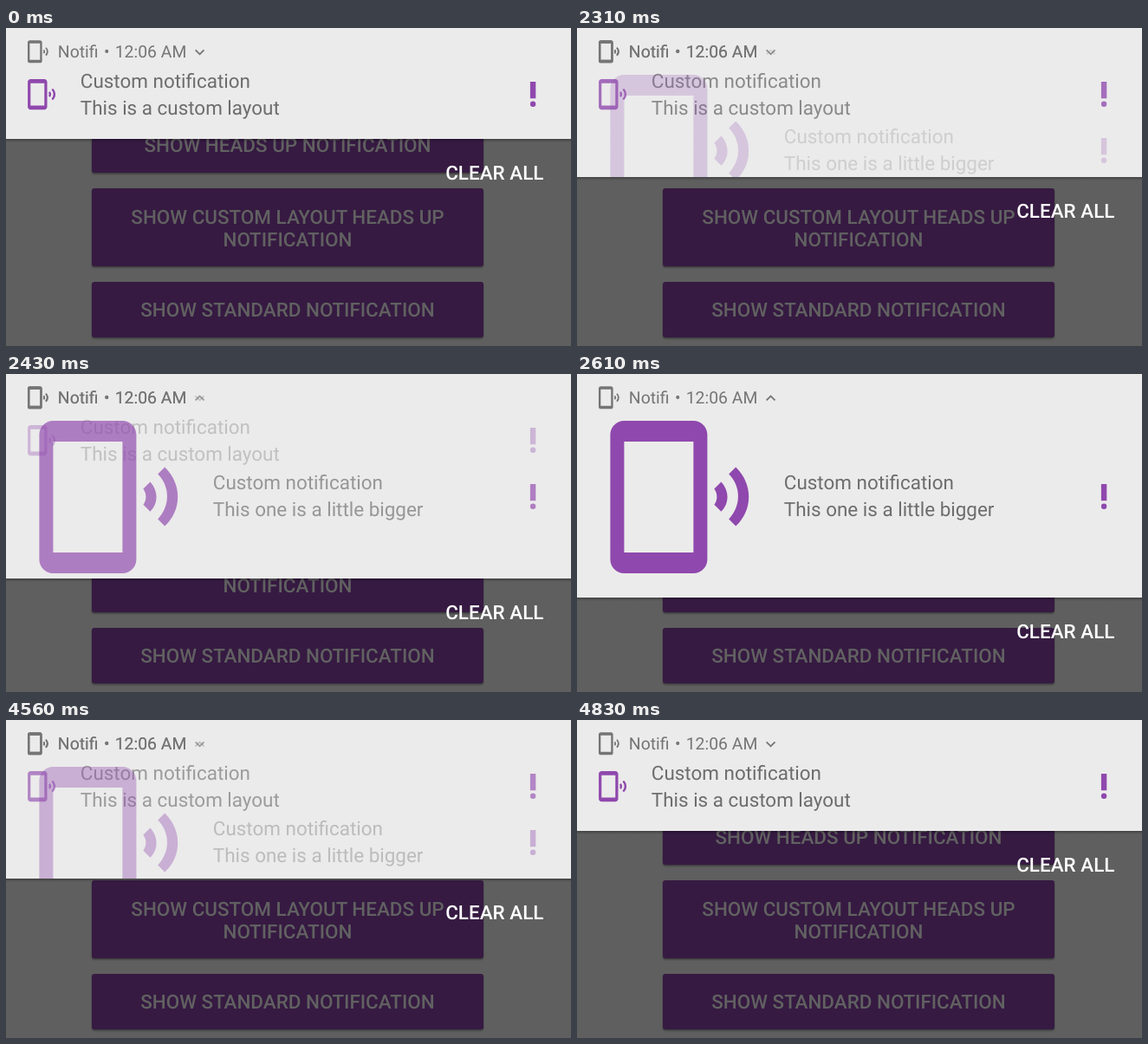
Animation of 652x367 px, one loop 5.46 s. Source, as an HTML page with a canvas:

```html
<!DOCTYPE html>
<html lang="en">
<head>
<meta charset="utf-8">
<title>Expanding notification</title>
<style>
  html, body { margin: 0; width: 100%; height: 100%; overflow: hidden; background: #5f5f5f; }
  canvas { display: block; width: 652px; height: 367px; }
</style>
</head>
<body>
<canvas id="stage" width="652" height="367"></canvas>
<script>
const ctx = document.getElementById('stage').getContext('2d');
const W = 652, H = 367, LOOP = 5460, STEP = 30;
const SMALL = 128, TALL = 258;
const PURPLE = '#8f48ad', GREY = '#757575', BODY = '#6d6d6d';
const FAMILY = 'Roboto, sans-serif', BODY_SIZE = 22.45, HEAD_SIZE = 19.4;

// Icons on a 24 unit grid
const ICON = {
  phone: new Path2D('M20.1 7.7l-1 1c1.8 1.8 1.8 4.6 0 6.5l1 1c2.5-2.3 2.5-6.1 0-8.5z' +
    'M18 9.8l-1 1c.5.7.5 1.6 0 2.3l1 1c1.2-1.2 1.2-3 0-4.3z' +
    'M14 1H4c-1.1 0-2 .9-2 2v18c0 1.1.9 2 2 2h10c1.1 0 2-.9 2-2V3c0-1.1-.9-2-2-2z' +
    'm0 19H4V4h10v16z'),
  alert: new Path2D('M10 3h4v12h-4zM14 19a2 2 0 1 1-4 0a2 2 0 1 1 4 0z'),
  down: new Path2D('M16.59 8.59L12 13.17 7.41 8.59 6 10l6 6 6-6z'),
  up: new Path2D('M12 8l-6 6 1.41 1.41L12 10.83l4.59 4.58L18 14z')
};

const clamp = v => Math.min(1, Math.max(0, v));

// Cubic bezier easing (0.4, 0, 0.2, 1)
function ease(x) {
  if (x <= 0 || x >= 1) return clamp(x);
  let lo = 0, hi = 1;
  for (let i = 0; i < 30; i++) {
    const s = (lo + hi) / 2, r = 1 - s;
    if (1.2 * r * r * s + 0.6 * r * s * s + s * s * s < x) lo = s; else hi = s;
  }
  return lo * lo * (3 - 2 * lo);
}

function icon(name, x, y, scale, color) {
  ctx.save();
  ctx.translate(x, y);
  ctx.scale(scale, scale);
  ctx.fillStyle = color;
  ctx.fill(ICON[name]);
  ctx.restore();
}

function text(str, x, y, size, color, weight = 400, align = 'left') {
  ctx.font = `${weight} ${size}px ${FAMILY}`;
  ctx.textAlign = align;
  ctx.fillStyle = color;
  ctx.fillText(str, x, y);
}

function button(top, height, lines, baseline) {
  ctx.save();
  ctx.shadowColor = 'rgba(0,0,0,0.4)';
  ctx.shadowBlur = 2;
  ctx.shadowOffsetY = 1.5;
  ctx.fillStyle = '#361a42';
  ctx.beginPath();
  ctx.roundRect(99, top, 452, height, 3);
  ctx.fill();
  ctx.restore();
  lines.forEach((line, i) => text(line, 325, baseline + 26 * i, BODY_SIZE, '#616161', 500, 'center'));
}

function header() {
  icon('phone', 22.6, 13, 1.19, GREY);
  text('Notifi', 59.8, 34, HEAD_SIZE, GREY);
  text('•', 116.3, 34, HEAD_SIZE, GREY, 400, 'center');
  text('12:06 AM', 125.7, 34, HEAD_SIZE, GREY);
}

function content(big, alpha) {
  if (alpha <= 0) return;
  header();
  ctx.globalAlpha = alpha;
  const x = big ? 238.8 : 85.8, y = big ? 133.3 : 69;
  icon(big ? 'up' : 'down', 212.4, 16.7, 0.93, GREY);
  if (big) icon('phone', 22.4, 46, 8, PURPLE);
  else icon('phone', 21.9, 57.4, 1.6, PURPLE);
  text('Custom notification', x, y, BODY_SIZE, BODY);
  text(big ? 'This one is a little bigger' : 'This is a custom layout', x, y + 31, BODY_SIZE, BODY);
  icon('alert', 588.9, big ? 122.3 : 57.3, 1.6, PURPLE);
  ctx.globalAlpha = 1;
}

// Panel growth and crossfade, both 0 (small) to 1 (tall)
function pose(t) {
  if (t < 2220 || t >= 4830) return { grow: 0, fade: 0 };
  if (t < 2610) return { grow: ease((t - 2176) / 465), fade: clamp((t - 2248) / 271) };
  if (t < 4440) return { grow: 1, fade: 1 };
  return { grow: 1 - ease((t - 4402) / 411), fade: 1 - clamp((t - 4408) / 242) };
}

function draw(time) {
  const { grow, fade } = pose(Math.floor(time / STEP) * STEP);
  const h = Math.round(SMALL + (TALL - SMALL) * grow);

  ctx.fillStyle = '#5f5f5f';
  ctx.fillRect(0, 0, W, H);
  button(103, 64, ['SHOW HEADS UP NOTIFICATION'], 142.5);
  button(185, 90, ['SHOW CUSTOM LAYOUT HEADS UP', 'NOTIFICATION'], 226);
  button(293, 64, ['SHOW STANDARD NOTIFICATION'], 333);

  const shade = ctx.createLinearGradient(0, h, 0, h + 4);
  shade.addColorStop(0, 'rgba(0,0,0,0.3)');
  shade.addColorStop(1, 'rgba(0,0,0,0)');
  ctx.fillStyle = shade;
  ctx.fillRect(0, h, W, 4);

  ctx.save();
  ctx.beginPath();
  ctx.rect(0, 0, W, h);
  ctx.clip();
  ctx.fillStyle = '#ebebeb';
  ctx.fillRect(0, 0, W, h);
  content(false, 1 - fade);
  content(true, fade);
  ctx.restore();

  text('CLEAR ALL', 507.2, h + 46.7, BODY_SIZE, '#fff', 500);
}

ctx.textRendering = 'geometricPrecision';
const start = performance.now();
function tick() {
  draw((performance.now() - start) % LOOP);
  requestAnimationFrame(tick);
}
tick();
</script>
</body>
</html>
```
